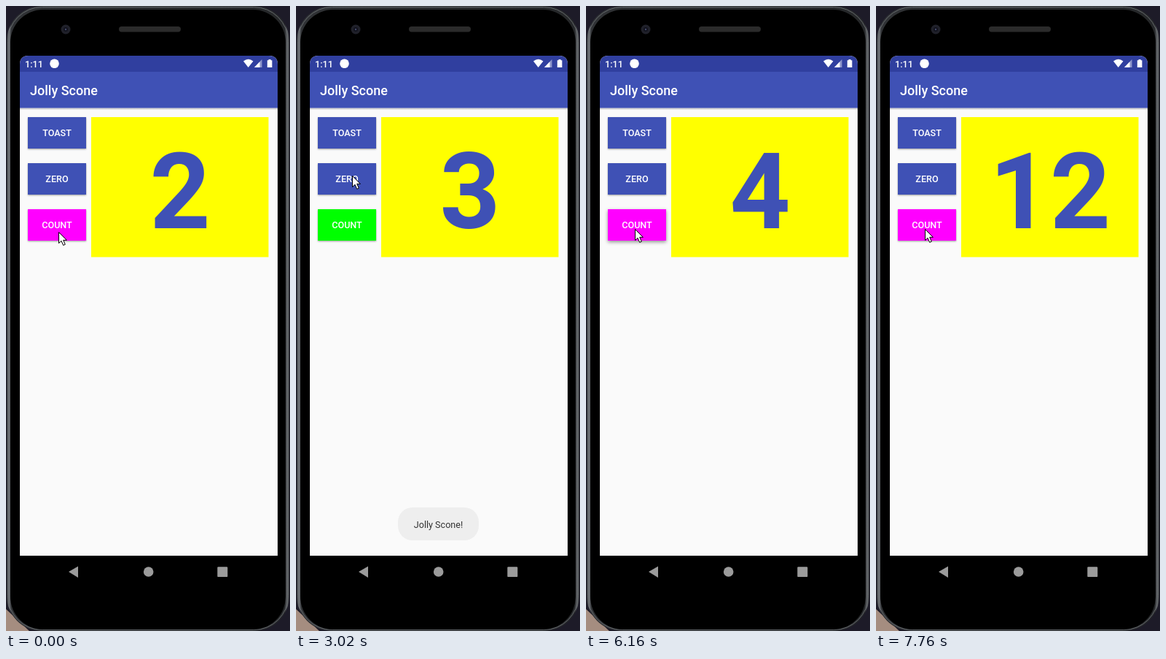
An HTML page for the animation above (8 s loop, 390 px wide and 855 px high).

```html
<!DOCTYPE html>
<html lang="en">
<head>
<meta charset="utf-8">
<title>Counter app</title>
<style>
html, body { margin: 0; width: 100%; height: 100%; overflow: hidden; background: #1d1b28; }
svg { display: block; width: 390px; height: 855px; font-family: Roboto, sans-serif; }
.button rect { fill: #3f51b5; filter: drop-shadow(0 1px 1px rgba(0,0,0,.38)); }
.button.pressed rect { filter: drop-shadow(0 2px 2.5px rgba(0,0,0,.42)); }
.button text { font-size: 12.6px; font-weight: 500; fill: #fff; text-anchor: middle; }
</style>
</head>
<body>
<svg viewBox="0 0 390 855">
  <defs>
    <linearGradient id="rim">
      <stop offset="0" stop-color="#25272a"/>
      <stop offset=".008" stop-color="#777b7f"/>
      <stop offset=".016" stop-color="#303235"/>
      <stop offset=".984" stop-color="#252729"/>
      <stop offset=".993" stop-color="#65686c"/>
      <stop offset="1" stop-color="#242628"/>
    </linearGradient>
    <linearGradient id="barShadow" x2="0" y2="1">
      <stop offset="0" stop-opacity=".25"/>
      <stop offset="1" stop-opacity="0"/>
    </linearGradient>
    <clipPath id="screen"><path d="M19 752V80Q19 68 31 68H361Q373 68 373 80V752Z"/></clipPath>
  </defs>

  <!-- Phone body -->
  <path d="M0 825L32 855H0Z" fill="#a58d80"/>
  <rect x="1" y="0" width="388" height="855" rx="48" fill="url(#rim)"/>
  <rect x="2.5" y="1.5" width="385" height="852" rx="47" fill="none" stroke="#65696d"/>
  <rect x="6" y="5" width="378" height="848" rx="45"/>
  <rect x="155" y="28" width="85" height="7.5" rx="3.7" fill="#2b2b2b"/>
  <circle cx="82" cy="32" r="6.5" fill="#20212a"/>
  <circle cx="82" cy="32" r="3" fill="#11121d"/>
  <circle cx="82" cy="32" r="1.2" fill="#454968"/>

  <!-- Screen -->
  <g clip-path="url(#screen)">
    <rect x="19" y="68" width="354" height="684" fill="#fafafa"/>
    <rect x="19" y="139.5" width="354" height="3" fill="url(#barShadow)"/>
    <rect x="19" y="90" width="354" height="49.5" fill="#3f51b5"/>
    <rect x="19" y="68" width="354" height="22" fill="#303f9f"/>
  </g>
  <g fill="#fff">
    <text x="26" y="83.5" font-size="12.6" font-weight="500">1:11</text>
    <circle cx="66.5" cy="78.7" r="6.3"/>
    <path d="M326 75.5Q332.7 70 339.5 75.5L332.7 84Z"/>
    <path d="M341 84L351.5 73V84Z" opacity=".45"/>
    <path d="M341 84L348.5 76.2V84Z"/>
    <path d="M358.8 74.2H360.6V73H363.6V74.2H365.4V84H358.8Z"/>
    <text x="33" y="122" font-size="18" font-weight="500">Jolly Scone</text>
  </g>

  <rect x="117" y="152" width="243.5" height="191.5" fill="#ff0"/>
  <text id="number" x="239" y="304" font-size="145" font-weight="700" fill="#3f51b5" text-anchor="middle"></text>
  <g id="buttons"></g>

  <g id="toast">
    <rect x="140" y="686" width="111" height="45" rx="20" fill="#eee"/>
    <text x="195.5" y="713.7" font-size="12.6" fill="#333" text-anchor="middle">Jolly Scone!</text>
  </g>

  <!-- Navigation -->
  <g fill="#9b9b9b">
    <path d="M86 774L99 766.5V782Z"/>
    <circle cx="195.7" cy="774" r="6.8"/>
    <rect x="290.3" y="767.3" width="14" height="13.8" rx="1.2"/>
  </g>

  <path id="cursor" d="M.5 .5V15.6L4 12.3L6.7 18.4L9.3 17.2L6.7 11.3H11.4Z" fill="#fff" stroke="#000"/>
</svg>
<script>
const LOOP = 8000;
const $ = id => document.getElementById(id);

// Each track lists [start time, value...]; values hold until the next entry.
const counts = [[0, 2], [800, 3], [3790, 0], [4740, 1], [5710, 2], [5860, 3], [6160, 4], [6310, 5],
  [6430, 6], [6700, 7], [6820, 8], [6970, 9], [7240, 10], [7390, 11], [7760, 12]];
const pointer = [[0, 72, 309], [1760, 74, 285], [1910, 82, 220], [2060, 86, 174],
  [2730, 84, 190], [2870, 79, 220], [3020, 77, 232],
  [4070, 78, 245], [4220, 77, 279], [4440, 75, 300],
  [5020, 73, 301], [5170, 70, 303], [5290, 68, 304], [5410, 67, 305]];
const presses = [[0, ''], [680, 'COUNT'], [800, ''], [2330, 'TOAST'], [2600, ''],
  [4590, 'COUNT'], [4740, ''], [5560, 'COUNT'], [7390, '']];
const toastAlpha = [[0, 0], [2450, .5], [2600, 1], [6010, .5], [6160, 0]];

const at = (track, t) => track.findLast(key => key[0] <= t).slice(1);

const buttons = ['TOAST', 'ZERO', 'COUNT'];
$('buttons').innerHTML = buttons.map((label, i) => `
  <g class="button" id="${label}" transform="translate(30 ${152 + 63 * i})">
    <rect width="80" height="43"/><text x="40" y="26.2">${label}</text>
  </g>`).join('');

const paint = (label, color) => $(label).firstElementChild.style.fill = color;

function draw(now) {
  const t = now % LOOP;
  const [count] = at(counts, t);
  const [pressed] = at(presses, t);
  $('number').textContent = count;
  paint('ZERO', count ? '#3f51b5' : '#888');
  paint('COUNT', !count ? '#3f51b5' : count % 2 ? '#0f0' : '#f0f');
  buttons.forEach(label => $(label).classList.toggle('pressed', label === pressed));
  $('toast').setAttribute('opacity', at(toastAlpha, t)[0]);
  $('cursor').setAttribute('transform', `translate(${at(pointer, t)})`);
}

const start = performance.now();
function tick() {
  draw(performance.now() - start);
  requestAnimationFrame(tick);
}
tick();
</script>
</body>
</html>
```
